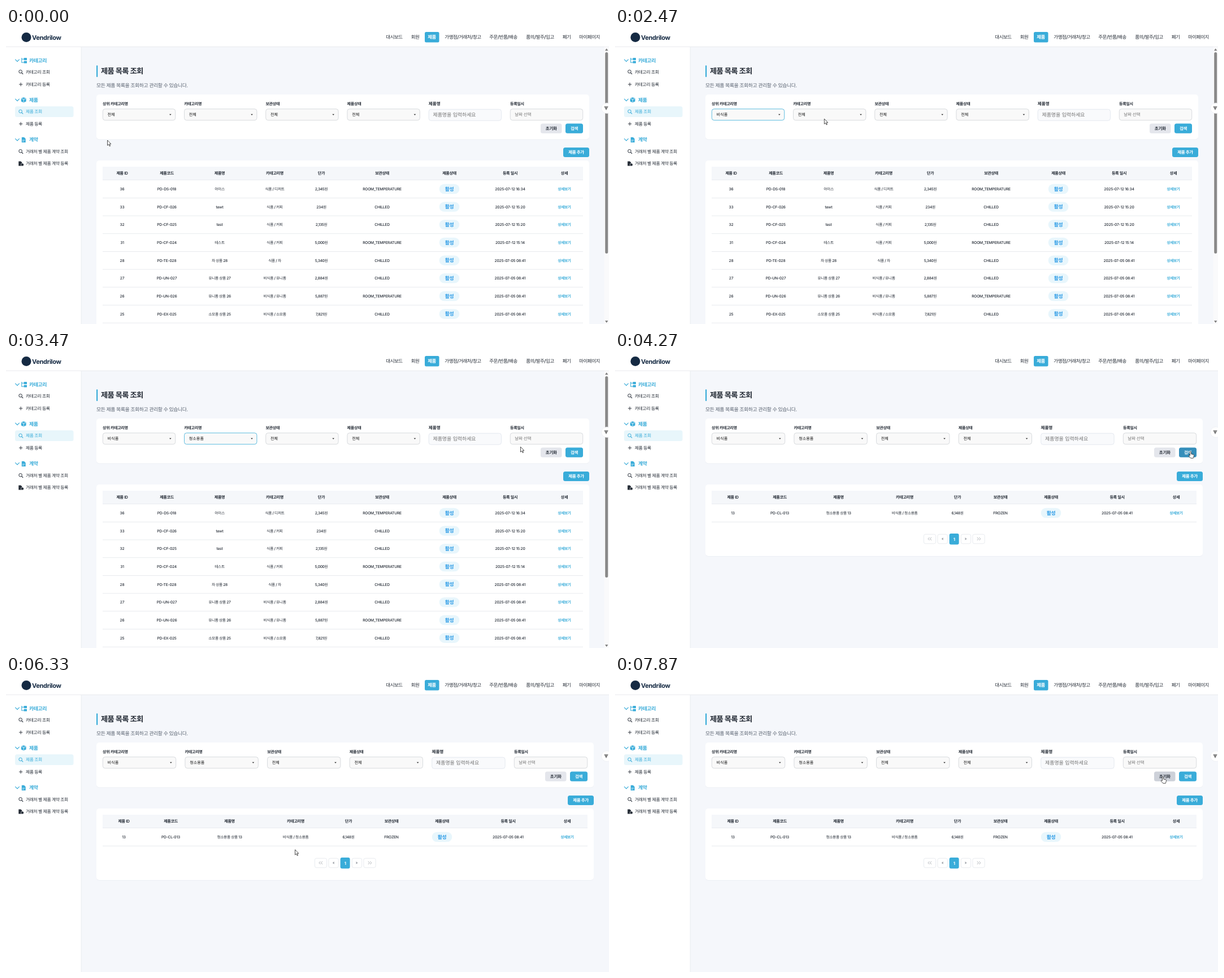
Animation of 1067x525 px, one loop 8000 ms. Source, as an HTML page:

```html
<!DOCTYPE html>
<html lang="ko">
<head>
<meta charset="utf-8">
<style>
  html, body { margin: 0; height: 100%; overflow: hidden; background: #f5f7fb; }
  svg { display: block; width: 100vw; height: 100vh; }
  text { font-family: Inter, 'Noto Sans CJK KR', 'Noto Sans CJK', sans-serif; text-rendering: geometricPrecision; white-space: pre; }
</style>
</head>
<body>
<svg id="stage" viewBox="0 0 1067 525"></svg>
<script>
const LOOP = 8000, TICK = 200 / 3;
const ACCENT = '#39acd9', INK = '#242b35', NAVY = '#152a43';
const LIST_OPEN = [1200, 2667], LIST_CLOSE = [2133, 3267], SEARCHED = 4130;

// Pointer path: time, x, y
const PATH = [
  [0, 179.5, 199], [67, 205, 183], [133, 227, 167], [333, 227, 167], [467, 227.5, 164],
  [667, 227.5, 164], [733, 230, 158], [1000, 236, 152], [1133, 236, 152], [1400, 226.5, 171],
  [1467, 226.5, 171], [1533, 227, 184], [1667, 227, 184], [1867, 227, 199], [2133, 227, 199],
  [2467, 370.5, 161], [2600, 373, 154], [2667, 373, 156], [2933, 372, 215], [3200, 372, 215],
  [3333, 500, 211], [3467, 911.5, 168], [3733, 975, 176], [4067, 1018.5, 176.5], [4600, 1018.5, 176.5],
  [4733, 1022, 180], [4800, 1009, 179], [5333, 1009, 179], [5600, 930, 260], [5867, 700, 347],
  [6200, 509, 306], [6333, 511.5, 308], [6533, 530, 273], [6733, 535, 305], [6867, 535, 305],
  [7333, 850, 215], [7667, 965, 190], [7733, 969.5, 178.5], [8000, 969.5, 178.5]
];

const LISTS = [
  ['전체', '식품', '비식품', '테스트', '테스트2'],
  ['전체', '유니폼', '소모품', '청소용품', '포장용품', '주방용품', '사무용품', '기타']
];
const HEADS = ['제품 ID', '제품코드', '제품명', '카테고리명', '단가', '보관상태', '제품상태', '등록 일시', '상세'];
const FULL = {
  right: 1021, step: 144.2, field: 129,
  columns: [205.5, 284.5, 378, 475.5, 558, 665.5, 784.5, 892, 988],
  rows: [
    '36|PD-DS-018|아이스|식품 / 디저트|2,345원|ROOM_TEMPERATURE|2025-07-12 16:34',
    '33|PD-CF-026|tewt|식품 / 커피|234원|CHILLED|2025-07-12 15:20',
    '32|PD-CF-025|test|식품 / 커피|2,135원|CHILLED|2025-07-12 15:20',
    '31|PD-CF-024|테스트|식품 / 커피|5,000원|ROOM_TEMPERATURE|2025-07-12 15:14',
    '28|PD-TE-028|차 상품 28|식품 / 차|5,340원|CHILLED|2025-07-05 08:41',
    '27|PD-UN-027|유니폼 상품 27|비식품 / 유니폼|2,884원|CHILLED|2025-07-05 08:41',
    '26|PD-UN-026|유니폼 상품 26|비식품 / 유니폼|5,887원|ROOM_TEMPERATURE|2025-07-05 08:41',
    '25|PD-EX-025|소모품 상품 25|비식품 / 소모품|7,821원|CHILLED|2025-07-05 08:41'
  ]
};
const FILTERED = {
  right: 1029, step: 145.6, field: 130,
  columns: [208.5, 291.5, 395.5, 512.5, 606, 682, 771.5, 888.5, 993],
  rows: ['13|PD-CL-013|청소용품 상품 13|비식품 / 청소용품|6,148원|FROZEN|2025-07-05 08:41']
};

const rect = (x, y, w, h, fill, r = 0, extra = '') =>
  `<rect x="${x}" y="${y}" width="${w}" height="${h}" rx="${r}" fill="${fill}" ${extra}/>`;
const path = (d, fill, extra = '') => `<path d="${d}" fill="${fill}" ${extra}/>`;
const line = (d, color, width = 1) => path(d, 'none', `stroke="${color}" stroke-width="${width}"`);

// y is the vertical middle of the text
function text(s, x, y, size, { fill = INK, weight = 400, anchor = 'start', spacing } = {}) {
  spacing ??= /[가-힣]/.test(s) ? -.048 : -.032;
  return `<text x="${x}" y="${y + size * .36}" font-size="${size}" font-weight="${weight}" fill="${fill}" ` +
    `text-anchor="${anchor}" letter-spacing="${spacing * size}">${s}</text>`;
}
const centered = (s, x, y, size, style) => text(s, x, y, size, { anchor: 'middle', ...style });

const card = (x, y, w, h) => rect(x, y + .8, w, h, '#e6e9ef', 5, 'opacity=".75"') + rect(x, y, w, h, '#fff', 5);

function mix(a, b, k) {
  return `rgb(${a.map((v, i) => Math.round(v + (b[i] - v) * k))})`;
}

function pointer(t) {
  const i = Math.max(1, PATH.findIndex(p => p[0] >= t));
  const [t0, x0, y0] = PATH[i - 1], [t1, x1, y1] = PATH[i];
  const k = Math.max(0, (t - t0) / (t1 - t0));
  return [x0 + (x1 - x0) * k, y0 + (y1 - y0) * k];
}

const layoutAt = t => t < SEARCHED ? FULL : FILTERED;
const BUTTONS = { reset: [-75, 37.5], search: [-31, 31] };

function over(name, t) {
  const [x, y] = pointer(t), left = layoutAt(t).right + BUTTONS[name][0];
  return x >= left && x <= left + BUTTONS[name][1] && y >= 169.5 && y <= 187;
}
// Hover colour eases in over three ticks
const hover = (name, t) => [0, 1, 2].reduce((sum, k) => sum + over(name, Math.max(0, t - k * TICK)), 0) / 3;

function searchIcon(y, color) {
  return `<circle cx="25.6" cy="${y - .7}" r="2.8" fill="none" stroke="${color}"/>` +
    line(`M27.6 ${y + 1.3}l2.6 2.6`, color, 1.2);
}
const plusIcon = y => line(`M23 ${y}h6.4M26.2 ${y - 3.2}v6.4`, INK, .9);

function header() {
  const items = [['대시보드', 687], ['회원', 724], ['제품', 753.5], ['가맹점/거래처/창고', 808.5],
    ['주문/반품/배송', 880], ['품의/발주/입고', 945], ['폐기', 992], ['마이페이지', 1032.5]];
  return rect(0, 0, 1067, 33, '#fff') + rect(0, 32.8, 1067, .8, '#e4e7ec') +
    `<circle cx="36" cy="16.4" r="8.5" fill="${NAVY}"/>` +
    text('Vendrilow', 46, 16.6, 11.1, { weight: 700, fill: NAVY }) +
    rect(741, 7, 25.5, 18.5, ACCENT, 2.5) +
    items.map(([s, x]) => centered(s, x, 16, 8.45,
      s === '제품' ? { fill: '#fff', weight: 700 } : { weight: 500 })).join('');
}

function sidebar() {
  const heading = (s, y) => line(`M16.3 ${y - 1.8}l3.7 3.8 3.7-3.8`, ACCENT, 1.2) +
    text(s, 41, y, 8.9, { fill: ACCENT, weight: 600 });
  const item = (s, y, fill = INK) => text(s, 35, y, 7.8, { fill, weight: 500 });
  return rect(0, 33.5, 133, 492, '#fff') + rect(132.7, 33.5, .8, 492, '#e6e9ee') +
    heading('카테고리', 57.5) +
    line('M27.8 53v8.2h4M27.8 55.3h4', ACCENT, 1.1) +
    rect(31.6, 53, 5.4, 4, ACCENT, .6) + rect(31.6, 58.6, 5.4, 4, ACCENT, .6) +
    searchIcon(78, INK) + item('카테고리 조회', 78) +
    plusIcon(100) + item('카테고리 등록', 100.3) +
    heading('제품', 127.5) +
    path('M31.2 123l4.4 1.8v5.4l-4.4 2-4.4-2v-5.4z', ACCENT) + line('M27 125l4.2 1.7 4.2-1.7M31.2 126.7v5', '#fff', .8) +
    rect(16, 139, 103.5, 19, '#e8f6fb', 3.5) +
    searchIcon(148.5, ACCENT) + item('제품 조회', 148.5, ACCENT) +
    plusIcon(170) + item('제품 등록', 170.3) +
    heading('계약', 198) +
    path('M27.8 193.7h4.2l2.7 2.7v6.6h-6.9z', ACCENT) + line('M29 199h4.4M29 201h2.6', '#fff', .7) +
    searchIcon(219, INK) + item('거래처 별 제품 계약 조회', 218.7) +
    path('M22.3 236.5h4l2.2 2.2v5.8h-6.2z', INK) +
    `<circle cx="28.9" cy="242.4" r="2.5" fill="${INK}" stroke="#fff" stroke-width=".6"/>` +
    item('거래처 별 제품 계약 등록', 240.4);
}

function filters(t, layout) {
  const { right, step, field } = layout;
  const values = [t < LIST_CLOSE[0] ? '전체' : '비식품', t < LIST_CLOSE[1] ? '전체' : '청소용품', '전체', '전체'];
  const focus = t >= SEARCHED || t < LIST_OPEN[0] ? -1 : t < LIST_OPEN[1] ? 0 : 1;
  let out = card(160, 118, right + 11 - 160, 79.5);
  ['상위 카테고리명', '카테고리명', '보관상태', '제품상태', '제품명', '등록일시'].forEach((label, i) => {
    const x = 171 + step * i, isName = i === 4;
    out += text(label, x, 134.7, isName ? 7.6 : 7.1, { weight: 600, spacing: isName ? 0 : undefined });
    const border = i === focus ? ACCENT : isName ? '#dfe4ec' : '#cfd2d6';
    out += rect(x + .3, isName ? 144.2 : 143.6, field - .6, 20, isName ? '#f9fafc' : '#f9f9f9', 4,
      `stroke="${border}" stroke-width=".8"`);
    if (i < 4) {
      out += text(values[i], x + 8.6, 153.6, 7.1, { spacing: 0, fill: '#111' }) +
        path(`M${x + field - 11} 152.8h3.6l-1.8 2z`, '#222');
    } else {
      out += isName ? text('제품명을 입력하세요', x + 7.7, 154.1, 8.9, { spacing: 0, fill: '#757575' })
        : text('날짜 선택', x + 8.2, 153.6, 7.4, { spacing: 0, fill: '#757575' });
    }
  });
  const [reset, search] = [BUTTONS.reset, BUTTONS.search];
  out += rect(right + reset[0], 169.5, reset[1], 17.3, mix([228, 230, 236], [205, 209, 217], hover('reset', t)), 3.5) +
    centered('초기화', right - 56.3, 178.3, 7.55, { weight: 600 }) +
    rect(right + search[0], 169.5, search[1], 17.3, mix([57, 172, 217], [54, 143, 187], hover('search', t)), 3.5) +
    centered('검색', right - 15.5, 178.3, 7.55, { weight: 700, fill: '#fff' });
  return out;
}

function table(layout) {
  const { right, columns, rows } = layout, edge = right + 11;
  let out = rect(edge - 46, 212, 46, 17, ACCENT, 3.5) +
    centered('제품 추가', edge - 23, 220.6, 7.55, { weight: 700, fill: '#fff' }) +
    card(160, 235, edge - 160, layout === FULL ? 310 : 127) +
    rect(171, 246, right - 171, 24, '#f5f7fa') + rect(171, 269.3, right - 171, .7, '#e4e8ed');
  HEADS.forEach((s, i) => out += centered(s, columns[i], 257.6, 7.1, { weight: 600 }));
  rows.forEach((row, r) => {
    const y = 285.5 + 31.67 * r, cells = row.split('|');
    cells.forEach((s, i) => out += centered(s, columns[i < 6 ? i : 7], y, 6.67, { weight: 500 }));
    out += rect(columns[6] - 17.8, y - 8.7, 35.6, 17.4, '#e8f6fc', 8.7) +
      centered('활성', columns[6], y - .2, 8.9, { weight: 600, fill: '#2c9be6' }) +
      centered('상세보기', columns[8], y, 6.67, { weight: 600, fill: ACCENT }) +
      rect(171, y + 15.5, right - 171, .8, '#e2e5ea');
  });
  return out;
}

function pagination() {
  const gray = '#a0a4aa', box = (x, w) => rect(x, 323.3, w, 16.6, '#fff', 3, 'stroke="#e3e6eb" stroke-width=".8"');
  return box(546.4, 21.2) + box(570.9, 17.4) + box(612.2, 17.4) + box(632.9, 21.2) +
    line('M556.6 328.8l-2.6 2.6 2.6 2.6M560 328.8l-2.6 2.6 2.6 2.6', gray, .9) +
    path('M580.7 329v4.8l-3-2.4z', gray) + path('M619.5 329v4.8l3-2.4z', gray) +
    line('M640.8 328.8l2.6 2.6-2.6 2.6M644.2 328.8l2.6 2.6-2.6 2.6', gray, .9) +
    rect(591.6, 322, 17, 19.6, ACCENT, 3) + centered('1', 600.2, 331.8, 7.5, { weight: 700, fill: '#fff' });
}

const scrollbar = () => rect(1058.5, 33.6, 8.5, 492, '#fafafb') + rect(1060.2, 43, 5, 357, '#898989', 2.5) +
  path('M1060 40.2h5.4l-2.7-4z', '#808080') + path('M1060 519h5.4l-2.7 4z', '#808080');

const sideTab = () => `<circle cx="1063" cy="142.2" r="9.3" fill="#fff" stroke="#e8eaee" stroke-width=".6"/>` +
  path('M1058.3 139h7.4l-3.7 7z', '#777') + line('M1060 140.8h4', '#bbb', .7);

function dropdown(t) {
  const i = LIST_OPEN.findIndex((start, n) => t >= start && t < LIST_CLOSE[n]);
  if (i < 0) return '';
  const items = LISTS[i], x = 171 + FULL.step * i;
  const active = Math.min(items.length - 1, Math.max(0, Math.floor((pointer(t)[1] - 165) / 15)));
  return rect(x + .4, 164.6, 128.3, items.length * 15 + .4, '#fff', 0, 'stroke="#777" stroke-width=".8"') +
    rect(x + .8, 165 + active * 15, 127.5, 14.8, '#1967d2') +
    items.map((s, n) => text(s, x + 8.6, 172.3 + n * 15, 7.1, { spacing: 0, fill: n === active ? '#fff' : '#111' })).join('');
}

function cursor(t) {
  const [x, y] = pointer(t), hand = over('reset', t) || over('search', t);
  const shape = hand
    ? 'M-1.1 7.2V1.1a1.1 1.1 0 0 1 2.2 0V4.4l3.6.8q1.4.4 1.3 1.8l-.7 3.2-.6 1.6H.2L-3.2 7.9q-.2-1.4 1-1.2z'
    : 'M0 0V9.3L2.2 7.3 3.7 10.7 5.1 10.1 3.6 6.8H6.4Z';
  return `<g transform="translate(${x} ${y})">` + path(shape, '#fff', 'stroke="#222" stroke-width=".8" stroke-linejoin="round"') + '</g>';
}

function scene(t) {
  const layout = layoutAt(t);
  return rect(0, 0, 1067, 525, '#f5f7fb') + sidebar() + header() +
    rect(160, 66.5, 2.2, 20.3, ACCENT) + text('제품 목록 조회', 168, 76.4, 13.3, { weight: 700 }) +
    text('모든 제품 목록을 조회하고 관리할 수 있습니다.', 160, 101.7, 8.9, { fill: '#596270' }) +
    filters(t, layout) + table(layout) + (layout === FULL ? scrollbar() : pagination()) +
    sideTab() + dropdown(t) + cursor(t);
}

const stage = document.getElementById('stage');
const start = performance.now();
let shown = -1;
function frame() {
  const tick = Math.floor(((performance.now() - start) % LOOP + 4) / TICK);
  if (tick !== shown) {
    shown = tick;
    stage.innerHTML = scene(Math.min(LOOP, tick * TICK));
  }
  requestAnimationFrame(frame);
}
frame();
</script>
</body>
</html>
```
